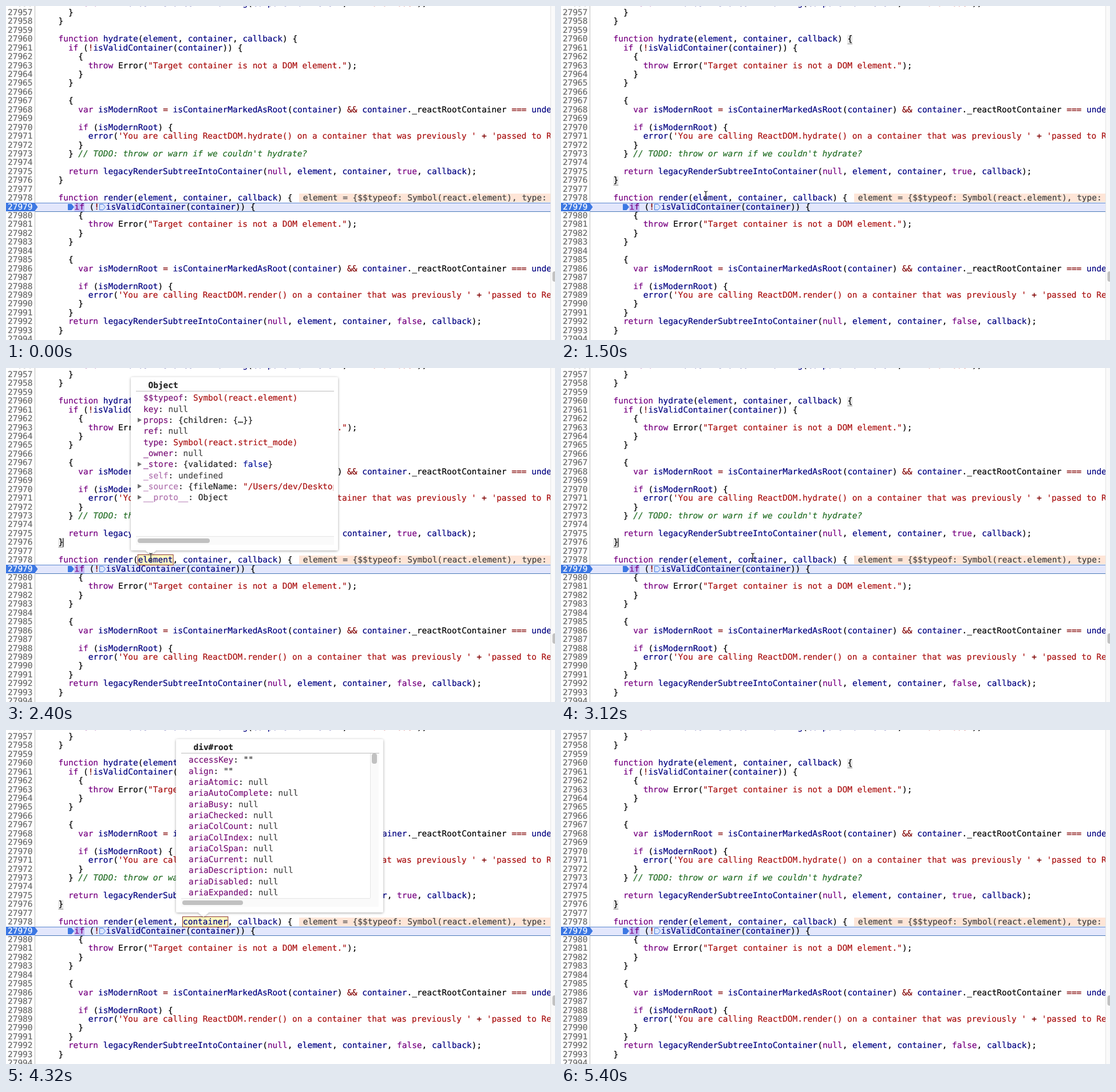
Recreate the animation shown at these times as an HTML page. Size 959 by 584 pixels, loop 5460 ms.

```html
<!DOCTYPE html>
<html lang="en">
<head>
<meta charset="utf-8">
<title>Debugger hover</title>
<style>
  html, body { margin: 0; width: 100%; height: 100%; overflow: hidden; background: #fff; }
  svg { display: block; }
  text {
    font: 14.45px "DejaVu Sans Mono", monospace;
    white-space: pre;
    text-rendering: geometricPrecision;
    stroke-width: .2px;
  }
  .bold { font-weight: bold; }
  .italic { font-style: italic; }
</style>
</head>
<body>
<svg id="stage" width="959" height="584" viewBox="0 0 959 584">
  <defs>
    <clipPath id="editor"><rect width="951.5" height="584"/></clipPath>
    <clipPath id="panel"><rect x="8" y="16" width="346" height="278"/></clipPath>
    <filter id="shadow" x="-10%" y="-10%" width="120%" height="120%">
      <feDropShadow dx="0" dy="1" stdDeviation="2" flood-color="#000" flood-opacity=".35"/>
    </filter>
  </defs>
</svg>
<script>
const LOOP = 5460, STEP = 60;
const CHAR = 8.7, LINE = 15.44, CODE_X = 56.7;
const FIRST = 27956, PAUSED = 27979;
const COLOR = {
  keyword: '#770080', name: '#000080', string: '#aa1111', comment: '#236e25',
  operator: '#800000', plain: '#000', prop: '#7a1278', value: '#aa1111',
  dim: '#484848', bool: '#0d1a9a', dark: '#262626'
};

const CODE = `        return findHostInstanceWithWarning(componentOrElement, 'findDOMNode');
      }
    }

    function hydrate(element, container, callback) {
      if (!isValidContainer(container)) {
        {
          throw Error("Target container is not a DOM element.");
        }
      }

      {
        var isModernRoot = isContainerMarkedAsRoot(container) && container._reactRootContainer === undefined;

        if (isModernRoot) {
          error('You are calling ReactDOM.hydrate() on a container that was previously ' + 'passed to ReactDOM.');
        }
      } // TODO: throw or warn if we couldn't hydrate?

      return legacyRenderSubtreeIntoContainer(null, element, container, true, callback);
    }

    function render(element, container, callback) {

        {
          throw Error("Target container is not a DOM element.");
        }
      }

      {
        var isModernRoot = isContainerMarkedAsRoot(container) && container._reactRootContainer === undefined;

        if (isModernRoot) {
          error('You are calling ReactDOM.render() on a container that was previously ' + 'passed to ReactDOM.');
        }
      }
      return legacyRenderSubtreeIntoContainer(null, element, container, false, callback);
    }
`.split('\n');

const CODE_RULES = [
  ['comment', /\/\/.*/], ['string', /"[^"]*"|'[^']*'/],
  ['keyword', /\b(?:function|return|if|throw|var|null|true|false)\b/],
  ['plain', /\.\w+|\bError\b/], ['name', /\w+/], ['operator', /[!=&+]+/]
];
const VALUE_RULES = [
  ['dark', /""/], ['value', /"[^"]+"|Symbol\([^)]*\)/],
  ['dim', /null|undefined/], ['bool', /true|false/], ['dark', /\w+|[{}…:]+/]
];

const stage = document.getElementById('stage');
const lineTop = n => 343.7 + (n - PAUSED) * LINE;
const baseline = n => lineTop(n) + 11.9;

function add(parent, tag, attrs = {}) {
  const el = document.createElementNS('http://www.w3.org/2000/svg', tag);
  for (const key in attrs) el.setAttribute(key, attrs[key]);
  parent.append(el);
  return el;
}
const rect = (p, x, y, width, height, fill, more) => add(p, 'rect', { x, y, width, height, fill, ...more });
const path = (p, d, fill, more) => add(p, 'path', { d, fill, ...more });
const group = (p, more) => add(p, 'g', more);

function text(p, x, y, str, fill, cls = '') {
  add(p, 'text', { x, y, fill, stroke: fill, class: cls }).textContent = str;
}

function tokens(p, x, y, str, rules) {
  const all = new RegExp(rules.map(r => `(${r[1].source})`).join('|') + '|[^\\s]', 'g');
  for (const m of str.matchAll(all)) {
    const i = m.slice(1).findIndex(g => g !== undefined);
    const kind = i < 0 ? 'plain' : rules[i][0];
    text(p, x + m.index * CHAR, y, m[0], COLOR[kind], kind === 'comment' ? 'italic' : '');
  }
}

// Editor
rect(stage, 0, 0, 959, 584, '#fff');
const editor = group(stage, { 'clip-path': 'url(#editor)' });
rect(editor, 50, 0, 1, 584, '#bbb');

const braces = group(editor);
for (const [n, col] of [[27960, 51], [27976, 4]]) {
  const x = CODE_X + col * CHAR, y = lineTop(n);
  rect(braces, x, y, CHAR, LINE, '#e6e6e6');
  rect(braces, x, y + LINE, CHAR, 1, '#888');
}

rect(editor, 51, 344, 901, 16, '#e3e7fc');
rect(editor, 51, 344, 901, 1, '#5b87cf');
rect(editor, 51, 359, 901, 1, '#4a78b8');
path(editor, 'M0 344H50L55.5 351.5L50 359H0Z', '#3d78e3');
rect(editor, 512, 328, 440, 15, '#fee5d7');
text(editor, 518.7, baseline(27978), 'element = {$$typeof: Symbol(react.element), type: Symbol', '#444');

CODE.forEach((str, i) => {
  const n = FIRST + i, y = baseline(n);
  text(editor, 3, y, n, n === PAUSED ? '#fff' : '#686868');
  tokens(editor, CODE_X, y, str, CODE_RULES);
});

const tag = (x, fill) => path(editor, `M${x} 346.5h6l4 5l-4 5h-6z`, fill, { stroke: '#3d78e3' });
rect(editor, 119.5, 345, 17.5, 14, '#c3b9f4');
tag(108.5, '#3d78e3');
tag(163.5, '#dce6fc');
tokens(editor, 119.5, baseline(PAUSED), 'if (!', CODE_RULES);
tokens(editor, 174.7, baseline(PAUSED), 'isValidContainer(container)) {', CODE_RULES);

const caret = rect(editor, 99.3, lineTop(27976), 1.2, LINE, '#000');

rect(stage, 951, 0, 8, 584, '#fafafa');
rect(stage, 951, 0, 1, 584, '#e4e4e4');
rect(stage, 954.5, 464, 9, 18, '#c1c1c1', { rx: 4 });

// Hover popovers
function popover({ left, tip, title, rows, word, wordX, thumb, scrolls }) {
  const all = group(stage);
  const width = word.length * CHAR;
  rect(all, wordX - .5, 326.5, width + 1, 18, '#fefbc0', { stroke: '#8a3028' });
  text(all, wordX, baseline(27978), word, COLOR.name);

  const p = group(all, { transform: `translate(${left} 0)` });
  path(p, `M3 16H359Q362 16 362 19V316Q362 319 359 319H${tip + 9}L${tip} 327L${tip - 9} 319H3Q0 319 0 316V19Q0 16 3 16Z`,
    '#fff', { filter: 'url(#shadow)' });
  text(p, 30.5, 34.9, title, '#222', 'bold');
  rect(p, 9, 40, 346, 1, '#bbb');

  const body = group(p, { 'clip-path': 'url(#panel)' });
  rows.forEach(([name, value, flags = ''], i) => {
    const y = 57.4 + i * 19.3, end = 22 + name.length * CHAR;
    if (flags.includes('>')) path(body, `M12 ${y - 9}l7 4l-7 4z`, '#6e6e6e');
    const label = group(body, { opacity: flags.includes('~') ? .6 : 1 });
    text(label, 22, y, name, COLOR.prop);
    text(body, end, y, ':', '#222');
    tokens(body, end + 2 * CHAR, y, value, VALUE_RULES);
  });

  const right = scrolls ? 339 : 355;
  rect(p, 9, 294, right - 9, 15, '#fafafa');
  rect(p, 9, 294, right - 9, 1, '#e6e6e6');
  rect(p, ...thumb, '#c1c1c1', { rx: 4 });
  if (scrolls) {
    rect(p, 339, 41, 15, 268, '#fafafa');
    rect(p, 339, 41, 1, 253, '#e6e6e6');
    rect(p, 342, 41, 9, 18, '#c1c1c1', { rx: 4 });
  }
  return all;
}

const elementTip = popover({
  left: 218, tip: 35, title: 'Object', word: 'element', wordX: 230.7, thumb: [12, 298, 126, 8],
  rows: [
    ['$$typeof', 'Symbol(react.element)'],
    ['key', 'null'],
    ['props', '{children: {…}}', '>'],
    ['ref', 'null'],
    ['type', 'Symbol(react.strict_mode)'],
    ['_owner', 'null'],
    ['_store', '{validated: false}', '>'],
    ['_self', 'undefined', '~'],
    ['_source', '{fileName: "/Users/dev/Desktop/"', '>~'],
    ['__proto__', 'Object', '>~']
  ]
});

const aria = 'Atomic AutoComplete Busy Checked ColCount ColIndex ColSpan Current Description Disabled Expanded';
const containerTip = popover({
  left: 297, tip: 48, title: 'div#root', word: 'container', wordX: 309, thumb: [11, 298, 106, 8], scrolls: true,
  rows: [['accessKey', '""'], ['align', '""'], ...aria.split(' ').map(s => ['aria' + s, 'null'])]
});

// Mouse pointers, drawn around their hot spots
const arrow = group(stage);
path(arrow, 'M0 0V14L3.3 11L5.6 16L8 15L5.8 10.2H10Z', '#000', { stroke: '#fff', 'stroke-width': 1 });
const beam = group(stage);
const BEAM = 'M-3 -7Q0 -7 0 -5Q0 -7 3 -7M0 -5V5M-3 7Q0 7 0 5Q0 7 3 7M-1.5 2H1.5';
path(beam, BEAM, 'none', { stroke: '#fff', 'stroke-width': 2.6, opacity: .7 });
path(beam, BEAM, 'none', { stroke: '#111', 'stroke-width': 1.2 });

// Time, x, y
const MOVES = [
  [60, 957, 470], [540, 245, 329], [1080, 245, 329], [1260, 253, 331],
  [2640, 253, 331], [3000, 335, 331], [4020, 335, 331], [4260, 345, 584]
];

function pointerAt(t) {
  const i = MOVES.findIndex(m => m[0] > t);
  if (i < 1) return MOVES[i < 0 ? MOVES.length - 1 : 0].slice(1);
  const [t0, x0, y0] = MOVES[i - 1], [t1, x1, y1] = MOVES[i];
  const k = (t - t0) / (t1 - t0), e = k * k * (3 - 2 * k);
  return [x0 + (x1 - x0) * e, y0 + (y1 - y0) * e];
}

const within = (t, from, to) => t >= from && t < to;
const show = (el, on) => { el.style.display = on ? '' : 'none'; };

function draw(now) {
  const t = Math.floor(now % LOOP / STEP) * STEP;
  const [x, y] = pointerAt(t);
  const focused = t >= 1200;
  show(braces, focused);
  show(caret, focused && (t - 1252) % 353 < 177);
  show(arrow, within(t, 60, 1200));
  show(beam, within(t, 1200, 4260));
  show(elementTip, within(t, 1740, 2820));
  show(containerTip, within(t, 3420, 5040));
  for (const el of [arrow, beam]) el.setAttribute('transform', `translate(${x} ${y})`);
}

const start = performance.now();
function tick() {
  draw(performance.now() - start);
  requestAnimationFrame(tick);
}
tick();
</script>
</body>
</html>
```
